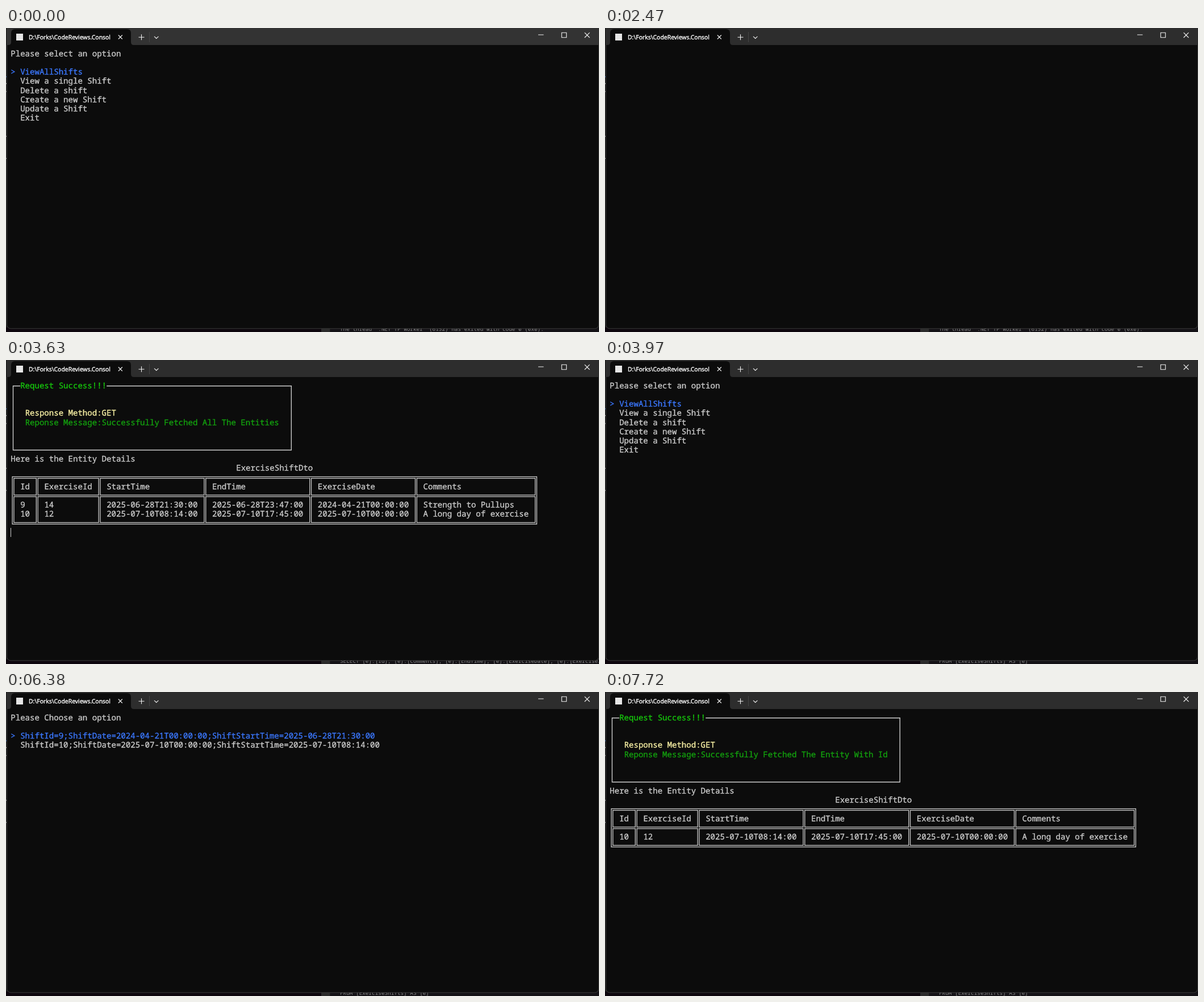
Animation, 1044 px wide and 536 px high, one loop 8 s. Source, as an HTML page:

```html
<!DOCTYPE html>
<html lang="en">
<head>
<meta charset="utf-8">
<title>Shift console</title>
<style>
  html, body { margin: 0; width: 100%; height: 100%; overflow: hidden; background: #0c0c0c; }
  svg { display: block; }
  text { white-space: pre; text-rendering: geometricPrecision; }
  .term, .log { font-family: "Noto Sans Mono", "DejaVu Sans Mono", monospace; }
  .term { font-size: 14.07px; }
  .term text { stroke-width: .35; }
  .log { font-size: 9.35px; fill: #8c8c8c; }
  .tab { font: 10.46px "Open Sans", "Noto Sans", sans-serif; fill: #fff; stroke: #fff; stroke-width: .4; }
  .icon { fill: none; stroke: #f2f2f2; stroke-width: 1.1; }
</style>
</head>
<body>
<svg width="1044" height="536" viewBox="0 0 1044 536">
  <rect width="1044" height="536" fill="#1c1c1c"/>
  <rect y="528" width="556" height="8" fill="#0d060d"/>
  <rect x="555" y="528" width="15" height="8" fill="#2b2b2b"/>
  <rect x="571" y="528" width="473" height="8" fill="#141216"/>
  <text id="log" class="log" x="588" y="534"></text>
  <g id="marks"></g>
  <rect x="1.5" y="-8" width="1042" height="538" rx="7" fill="#0c0c0c" stroke="#3c3c3c"/>
  <rect id="bar" x="1" width="1043" height="30"/>
  <path d="M4 30Q9 30 9 25V9Q9 2 16 2H213Q220 2 220 9V25Q220 30 225 30Z" fill="#0c0c0c"/>
  <rect x="18" y="10" width="12" height="12" fill="#e6e6e6"/>
  <text class="tab" x="40" y="20">D:\Forks\CodeReviews.Consol</text>
  <path class="icon" d="M197.8 12.5l7 7m0-7l-7 7M233.5 16.3h10m-5-5v10M261 14.8l3.7 3.6l3.7-3.6"/>
  <path d="M252.5 7v18" stroke="#454545"/>
  <path class="icon" d="M937 12h9.5M978.3 8.3h8.4v8.4h-8.4zM1018.7 8.2l8.8 8.8m0-8.8l-8.8 8.8"/>
  <g id="screen" class="term"></g>
</svg>
<script>
const LOOP = 8000, CELL = 8.445, ROW = 16.15, LEFT = 8.3;
const GRAY = '#cccccc', BLUE = '#3b78ff', GREEN = '#16c60c', DARK_GREEN = '#13a10e', YELLOW = '#f9f1a5';
const el = id => document.getElementById(id);

const colX = c => LEFT + CELL * c;
const midX = c => colX(c + .5);
const midY = r => 45.7 + ROW * r;

const text = (col, row, str, fill = GRAY) =>
  `<text x="${colX(col)}" y="${50 + ROW * row}" fill="${fill}" stroke="${fill}">${str.replace(/>/g, '&gt;')}</text>`;

const box = (x1, y1, x2, y2) =>
  `<rect x="${x1}" y="${y1}" width="${x2 - x1}" height="${y2 - y1}" fill="none" stroke="${GRAY}" stroke-width="1.3"/>`;

const cursor = row => `<rect x="8" y="${Math.round(37.7 + ROW * row)}" width="1" height="16" fill="${GRAY}"/>`;

function menu(title, items, picked) {
  return text(0, 0, title) + items.map((item, i) => {
    const on = i === picked, color = on ? BLUE : GRAY;
    return (on ? text(0, i + 2, '>', color) : '') + text(2, i + 2, item, color);
  }).join('');
}

function panel(message, lastCol) {
  const x1 = midX(0), x2 = midX(lastCol), y1 = midY(0), y2 = midY(7);
  return `<path d="M${colX(2)} ${y1}H${x1}V${y2}H${x2}V${y1}H${colX(20)}" fill="none" stroke="${GRAY}" stroke-width="1.4"/>`
    + text(2, 0, 'Request Success!!!', GREEN)
    + text(3, 3, 'Response Method:GET', YELLOW)
    + text(3, 4, 'Reponse Message:' + message, DARK_GREEN);
}

const SEPS = [0, 5, 18, 40, 62, 84, 109];
const HEAD = ['Id', 'ExerciseId', 'StartTime', 'EndTime', 'ExerciseDate', 'Comments'];

function table(rows) {
  const gap = 1.4, end = 13 + rows.length;
  const line = (cells, row) => cells.map((s, i) => text(SEPS[i] + 2, row, s)).join('');
  let out = text(0, 8, 'Here is the Entity Details') + text(47, 9, 'ExerciseShiftDto')
    + box(midX(0) - gap, midY(10) - gap, midX(109) + gap, midY(end) + gap);
  for (let i = 0; i < HEAD.length; i++)
    for (const [top, bottom] of [[10, 12], [12, end]])
      out += box(midX(SEPS[i]) + gap, midY(top) + gap, midX(SEPS[i + 1]) - gap, midY(bottom) - gap);
  return out + line(HEAD, 11) + rows.map((r, i) => line(r, 13 + i)).join('');
}

const SHIFTS = [
  ['9', '14', '2025-06-28T21:30:00', '2025-06-28T23:47:00', '2024-04-21T00:00:00', 'Strength to Pullups'],
  ['10', '12', '2025-07-10T08:14:00', '2025-07-10T17:45:00', '2025-07-10T00:00:00', 'A long day of exercise']
];
const OPTIONS = ['ViewAllShifts', 'View a single Shift', 'Delete a shift', 'Create a new Shift', 'Update a Shift', 'Exit'];
const CHOICES = SHIFTS.map(s => `ShiftId=${s[0]};ShiftDate=${s[4]};ShiftStartTime=${s[2]}`);

const mainMenu = n => menu('Please select an option', OPTIONS, n);
const shiftMenu = n => menu('Please Choose an option', CHOICES, n);
const allShifts = panel('Successfully Fetched All The Entities', 58) + table(SHIFTS);
const oneShift = panel('Successfully Fetched The Entity With Id', 60) + table([SHIFTS[1]]);

const THREAD = "The thread '.NET TP Worker' (6152) has exited with code 0 (0x0).";
const SELECT = 'SELECT [e].[Id], [e].[Comments], [e].[EndTime], [e].[ExerciseDate], [e].[ExerciseId]';
const FROM = 'FROM [ExerciseShifts] AS [e]';

// Each track lists [start time, value].
const screens = [
  [0, mainMenu(0)],
  [2470, ''],
  [2540, allShifts + cursor(16)],
  [3100, allShifts],
  [3630, allShifts + cursor(16)],
  [3710, mainMenu(0)],
  [5030, mainMenu(1)],
  [6380, shiftMenu(0)],
  [6710, shiftMenu(1)],
  [7060, cursor(0) + text(0, 2, '>', '#1d1d4a')],
  [7390, oneShift + cursor(15)],
  [7590, oneShift]
];
const logs = [[0, THREAD], [2930, SELECT], [3970, FROM], [6780, SELECT], [7660, FROM]];
const bars = [[0, '#333333'], [940, '#2d2d2d']];

const at = (track, t) => track.filter(k => k[0] <= t).pop()[1];

// Slivers of the window behind, along both edges.
el('marks').innerHTML = [[0, 85, '#2f5f9f'], [0, 97, '#999'], [0, 111, '#777'], [0, 190, '#888'], [0, 229, '#888'],
  [1043, 170, '#888'], [1043, 312, '#777'], [1043, 337, '#777'], [1043, 404, '#666']]
  .map(([x, y, c]) => `<rect x="${x}" y="${y}" width="1" height="2" fill="${c}"/>`).join('');

let shown = null;
function draw(t) {
  const screen = at(screens, t);
  if (screen !== shown) el('screen').innerHTML = shown = screen;
  el('log').textContent = at(logs, t);
  el('bar').setAttribute('fill', at(bars, t));
}

const start = performance.now();
function tick() {
  draw((performance.now() - start) % LOOP);
  requestAnimationFrame(tick);
}
tick();
</script>
</body>
</html>
```
